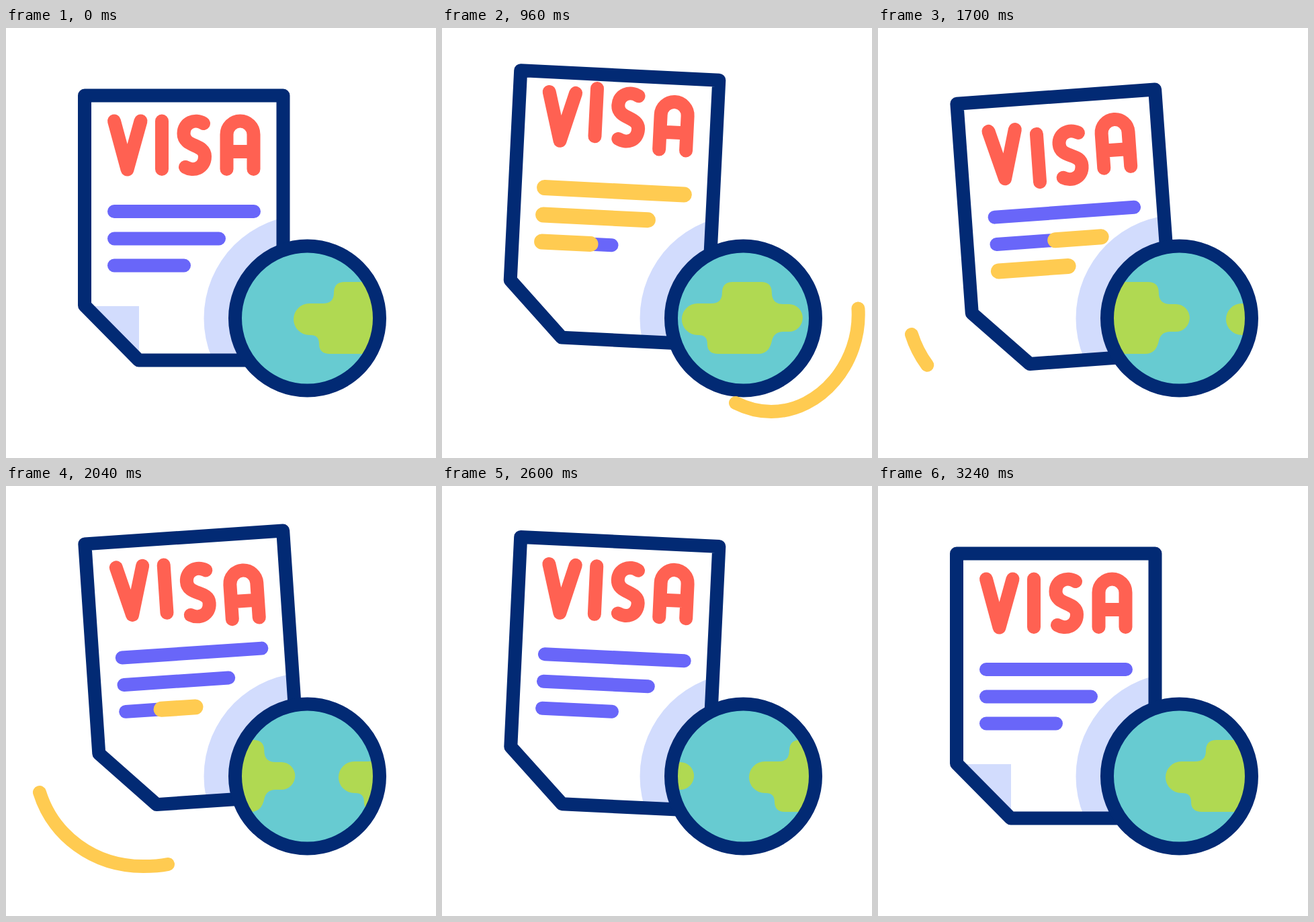
Animation, 640 px wide and 640 px high, one loop 3440 ms. Source, as an HTML page:

```html
<!DOCTYPE html>
<html lang="en">
<head>
<meta charset="utf-8">
<title>Visa document</title>
<style>
  html, body { margin: 0; width: 100%; height: 100%; overflow: hidden; background: #fff; }
  svg { display: block; width: 100%; height: 100%; }

  .page, .fold, .letters path, .marks path, .swish path, .land {
    animation: 3440ms cubic-bezier(.333, 0, .667, 1) infinite both;
  }
  .line { fill: none; stroke-linecap: round; stroke-linejoin: round; stroke-width: 20; }
  .navy { stroke: #022a74; }
  .red { stroke: #ff6152; }
  .purple { stroke: #6966f9; }
  .yellow { stroke: #ffcb51; }

  /* page: vertical float plus swing around the middle of its top edge */
  .page { transform-origin: 265px 100.5px; animation-name: float, swing; }
  @keyframes float {
    0%, 6.977% { translate: 0 0; }
    23.343%, 26.424% { translate: 0 -31px; }
    43.023% { translate: 0 10px; }
    65.116%, 66.86% { translate: 0 -31px; }
    86.047%, 100% { translate: 0 0; }
  }
  @keyframes swing {
    0%, 13.953% { rotate: 0deg; }
    30.233% { rotate: 3deg; }
    50.291%, 57.558% { rotate: -4.15deg; }
    71.802% { rotate: 3deg; }
    92.442%, 100% { rotate: 0deg; }
  }

  .fold { animation-name: fold; animation-timing-function: step-end; }
  @keyframes fold {
    0% { visibility: visible; }
    6.977% { visibility: hidden; }
    94.186%, 100% { visibility: visible; }
  }

  /* letters bob one after another */
  .letters path { animation-name: bob; animation-delay: calc(var(--i) * 200ms); }
  @keyframes bob {
    0%, 6.977% { translate: 0 0; }
    21.512% { translate: 0 -17px; }
    40.988% { translate: 0 17px; }
    55.523%, 100% { translate: 0 0; }
  }

  /* strokes draw on, then wipe off from their start */
  .marks path, .swish path { stroke-dasharray: 1 3; animation-delay: var(--d, 0ms); }
  .marks path { animation-name: mark; stroke-width: 23; }
  @keyframes mark {
    0%, 6.977% { stroke-dashoffset: 1.01; }
    15.698%, 39.535% { stroke-dashoffset: 0; }
    48.256%, 100% { stroke-dashoffset: -1.01; }
  }
  .swish path { animation-name: swish; }
  @keyframes swish {
    0%, 11.628% { stroke-dashoffset: 1.01; }
    27.035% { stroke-dashoffset: 0; }
    38.081%, 100% { stroke-dashoffset: -1.01; }
  }

  /* the second land mass arrives where the first one began */
  .land { animation-timing-function: linear; }
  .leaving { animation-name: leave; }
  .coming { animation-name: come; }
  @keyframes leave {
    0%, 6.977% { translate: 428px 0; }
    94.186%, 100% { translate: 132px 0; }
  }
  @keyframes come {
    0%, 6.977% { translate: 617px 0; }
    75.581% { translate: 457px 0; animation-timing-function: cubic-bezier(.33, .5, .67, 1); }
    94.186%, 100% { translate: 428px 0; }
  }
</style>
</head>
<body>
<svg viewBox="0 0 640 640">
  <defs>
    <clipPath id="sheet">
      <path class="page" d="M117 100.5H412.5V494.5H197.5L117 413Z"/>
    </clipPath>
    <clipPath id="sea"><circle cx="448.5" cy="432" r="99"/></clipPath>
    <path id="land" d="M76 378H118Q134 378 134 394Q134 411 151 411H159.500A20.5 20.5 0 0 1 159.500 452H151Q137 452 134 466Q130 485 114 485H54Q38 485 38 470Q38 457 25 457H23.500A23.5 23.5 0 0 1 23.500 410H44Q60 410 60 394Q60 378 76 378Z"/>
  </defs>

  <g clip-path="url(#sheet)">
    <circle cx="448.5" cy="432" r="154" fill="#d2dcfd"/>
  </g>

  <g class="page">
    <path class="fold" fill="#d2dcfd" d="M118 414H198V494Z"/>
    <path class="line navy" d="M117 100.5H412.5V494.5H197.5L117 413Z"/>
    <g class="line purple">
      <path d="M161 273H369"/>
      <path d="M161 313.500H317"/>
      <path d="M161 353.500H265"/>
    </g>
    <g class="line yellow marks">
      <path pathLength="1" d="M161 273H369"/>
      <path pathLength="1" d="M161 313.500H317" style="--d: 180ms"/>
      <path pathLength="1" d="M161 353.500H265" style="--d: 530ms"/>
    </g>
    <g class="line red letters" role="img" aria-label="VISA">
      <path style="--i: 0" d="M161 138.500L180.500 210.500L200.500 138.500"/>
      <path style="--i: 1" d="M232 138.500V210"/>
      <path style="--i: 2" d="M294 142C281 134 264.500 141 264.500 157C264.500 178 296 172 296 191C296 209 279 214 267 207"/>
      <path style="--i: 3" d="M328.500 210V158.500A20 20 0 0 1 368.500 158.500V210M328.500 184H368.500"/>
    </g>
  </g>

  <circle cx="448.5" cy="432" r="107.5" fill="#67cbd1"/>
  <g clip-path="url(#sea)" fill="#b0d952">
    <use class="land leaving" href="#land"/>
    <use class="land coming" href="#land"/>
  </g>
  <circle class="line navy" cx="448.5" cy="432" r="107.5"/>

  <g class="line yellow swish">
    <path pathLength="1" d="M619 412C627 495 565 571 490 571C472 571 453 566 437 558"/>
    <path pathLength="1" d="M50 456C70 520 130 566 204 566C218 566 232 565 243 562.500" style="--d: 1140ms"/>
  </g>
</svg>
</body>
</html>
```
